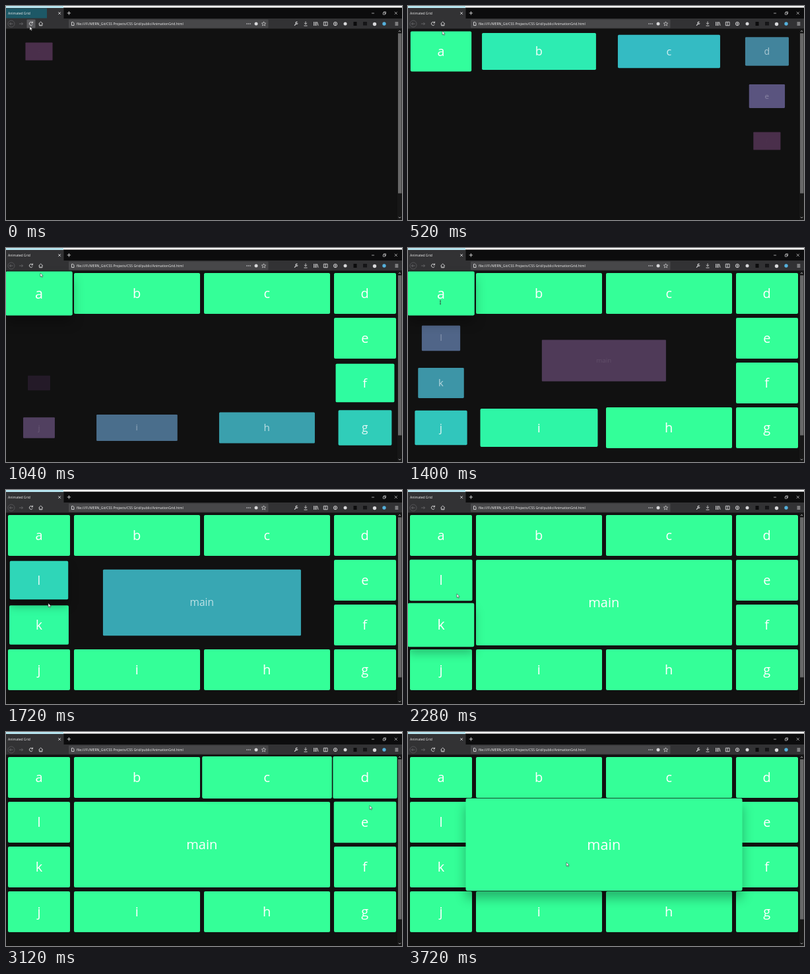
Recreate the animation shown at these times as an HTML page. Size 600 px wide and 325 px high, loop 3.76 s.

```html
<!DOCTYPE html>
<html lang="en">
<head>
<meta charset="utf-8">
<title>Animated Grid</title>
<style>
  html, body { margin: 0; width: 100%; height: 100%; overflow: hidden; background: #111; }
  #stage { position: relative; width: 600px; height: 325px; overflow: hidden; background: #111; }
  svg { position: absolute; left: 0; top: 0; }
  svg text { font-family: "Open Sans", "Noto Sans", sans-serif; }
  .icon { fill: none; stroke: #d8d8da; stroke-width: .9; }
  .dim { stroke: #69696c; }
  .cell {
    position: absolute; border-radius: 2px; text-align: center; visibility: hidden;
    font-family: "Open Sans", "Noto Sans", sans-serif; font-size: 20px;
  }
  #burst { animation: burst 3760ms linear infinite; }
  @keyframes burst { 0% { opacity: 1; } 9%, 100% { opacity: 0; } }
</style>
</head>
<body>
<div id="stage">
  <svg width="600" height="325">
    <rect width="600" height="35" fill="#0c0c0d"/>
    <rect width="600" height="2.5" fill="#fff"/>
    <rect width="87" height="3" fill="#b9e6f1"/>
    <rect y="3" width="87.5" height="16" fill="#323234"/>
    <rect y="19" width="600" height="15.5" fill="#323234"/>
    <rect id="burst" y="3.5" width="62" height="15" fill="#1d5967"/>
    <text x="3" y="12.8" font-size="5" fill="#eee">Animated Grid</text>
    <g class="icon">
      <path d="M79.3 9.2l3.6 3.6m0-3.6l-3.6 3.6M92.7 10.8h5.4m-2.7-2.7v5.4"/>
      <path d="M554 11h4M571.3 10h3v3h-3zM572.5 10v-1.2h3v3h-1.2M588.8 8.8l4 4m0-4l-4 4" stroke-width=".7"/>
      <g class="dim">
        <circle cx="8" cy="27" r="5" stroke-width=".6"/>
        <path d="M10.5 27h-5m2-2l-2 2 2 2M20 27h5.500m-2-2l2 2-2 2"/>
      </g>
      <rect id="hover" x="31.500" y="20.500" width="13" height="13" rx="1" fill="#5a5a5d" stroke="none"/>
      <path d="M40 25.200A2.600 2.600 0 1 0 40.300 28M40.500 23.500v2.300h-2.300"/>
      <path d="M49.500 27l3.200-3 3.200 3M50.500 26.500v3.300h4.400v-3.300M52.700 28v1.800"/>
    </g>
    <rect x="95" y="20.500" width="302.500" height="13" rx="1" fill="#474749"/>
    <path class="icon" d="M99.500 24.500h2.200l1.300 1.300v3.700h-3.500z" stroke-width=".6"/>
    <text x="107" y="28.900" font-size="5.100" fill="#f2f2f2">file:///F:/MERN_Git/CSS Projects/CSS Grid/public/AnimationGrid.html</text>
    <g fill="#d8d8da">
      <circle cx="365" cy="27" r=".8"/><circle cx="367.500" cy="27" r=".8"/><circle cx="370" cy="27" r=".8"/>
      <circle cx="379" cy="27" r="2.500"/>
      <circle cx="514" cy="27" r="2.500"/>
      <circle cx="558.500" cy="27.500" r="2.700"/>
      <rect x="526.500" y="24" width="5" height="6" fill="#0b0b0c"/>
      <rect x="541" y="24" width="6" height="5.500" fill="#151517"/>
      <circle cx="573" cy="27" r="2.700" fill="#55b1dc"/>
    </g>
    <g class="icon">
      <path d="M390.500 23.800l.9 2.100 2.300.2-1.700 1.500.5 2.300-2-1.200-2 1.200.5-2.300-1.700-1.500 2.300-.2z" stroke-width=".7"/>
      <path d="M437 29.700l3-3m1.500-2.200a1.500 1.500 0 1 0 .5 1.700" stroke-width="1.200"/>
      <path d="M454 23.500v4m-2-1.700l2 2 2-2M451.500 30h5"/>
      <path d="M466.500 24v6M468.500 24v6M470.300 24v6M471.500 24.300l1.600 5.500"/>
      <path d="M481.300 24.300h5.800v5.400h-5.800zM484 24.300v5.400"/>
      <circle cx="499" cy="27" r="2.700"/><circle cx="499" cy="26.500" r=".7"/><path d="M499 27v2.500"/>
      <path d="M589.500 25h4.800m-4.800 2h4.800m-4.800 2h4.800"/>
    </g>
    <rect x="593" y="34.500" width="7" height="290.500" fill="#171717"/>
    <rect x="594" y="41.500" width="5.500" height="243" fill="#686868"/>
    <path d="M595 39l1.500-1.500 1.500 1.500M595 320.500l1.500 1.500 1.500-1.500" class="icon" stroke-width=".7"/>
  </svg>
  <svg id="pointer" width="600" height="325" style="z-index:20">
    <path id="arrow" d="M0 0v5.800l1.400-1.200.9 2 1-.4-.9-2h1.800z" fill="#fff" stroke="#222" stroke-width=".5"/>
    <path id="beam" d="M-1 0h2M0 0v5M-1 5h2" fill="none" stroke="#333" stroke-width=".8"/>
  </svg>
</div>
<script>
const LOOP = 3760, FADE = 160;
const $ = id => document.getElementById(id);
const clamp = v => Math.max(0, Math.min(1, v));

// Columns and rows: start and size
const cols = [[3, 94], [103, 190.5], [300, 190.5], [497, 93.5]];
const rows = [38, 106, 174, 242];
const ring = [[0, 0], [1, 0], [2, 0], [3, 0], [3, 1], [3, 2], [3, 3], [2, 3], [1, 3], [0, 3], [0, 2], [0, 1]];

function addCell(label, x, y, w, h) {
  const el = document.createElement("div");
  el.className = "cell";
  el.textContent = label;
  el.style.cssText = `left:${x}px;top:${y}px;width:${w}px;height:${h}px;line-height:${h}px`;
  $("stage").append(el);
  return el;
}
const cells = ring.map(([c, r], i) => addCell("abcdefghijkl"[i], cols[c][0], rows[r], cols[c][1], 62));
cells.push(addCell("main", 103, 106, 387.5, 130));

// Fill colour along the entrance: [progress, colour]
const tints = [
  [-.4, "111111"], [0, "231927"], [.5, "4a2f4b"], [1, "51405f"], [1.55, "5b5681"],
  [2, "4a6d8c"], [2.6, "41889f"], [3, "3a9fac"], [3.5, "34bbc3"], [4, "30ccb9"],
  [4.4, "2ce8b6"], [5, "2ffca0"], [6, "34ff98"]
].map(([q, hex]) => [q, ...hex.match(/../g).map(h => parseInt(h, 16))]);

// Hovered cells in order: [cell, enter, leave]
const hovers = [
  [0, 620, 1560], [11, 1560, 1720], [10, 1720, 2260], [11, 2260, 2480], [0, 2480, 2740],
  [1, 2740, 2880], [2, 2880, 3030], [3, 3030, 3110], [4, 3110, 3200], [5, 3200, 3380], [12, 3380, LOOP]
];

// Pointer path: [time, x, y]
const path = [
  [0, 36, 31], [80, 36, 31], [280, 52, 38], [1180, 52, 38], [1400, 49, 80], [1560, 54, 104],
  [1720, 64, 172], [1980, 72, 200], [2260, 74, 166], [2280, 74, 158], [2480, 66, 102],
  [2620, 62, 72], [2740, 98, 62], [2880, 296, 58], [3030, 492, 66], [3120, 551, 111],
  [3200, 550, 172], [3300, 538, 208], [3380, 492, 208], [3560, 330, 204], [3720, 240, 198], [LOOP, 240, 198]
];

// Linear lookup in a list keyed by its first value
function sample(list, k) {
  let i = 1;
  while (i < list.length - 1 && list[i][0] < k) i++;
  const a = list[i - 1], b = list[i];
  const f = clamp((k - a[0]) / (b[0] - a[0]));
  return a.slice(1).map((v, n) => v + (b[n + 1] - v) * f);
}

function hoverAmount(cell, t) {
  let sum = 0;
  for (const [c, enter, leave] of hovers) {
    if (c !== cell || t < enter) continue;
    const peak = clamp((Math.min(t, leave) - enter) / FADE);
    sum += Math.max(0, peak - Math.max(0, t - leave) / FADE);
  }
  return clamp(sum);
}

function draw(t) {
  const s = t / 1000;
  const wave = .5 + 10.1 * s - .925 * s * s;
  cells.forEach((el, i) => {
    const q = wave - i, st = el.style;
    st.visibility = q > -.4 ? "visible" : "hidden";
    if (q <= -.4) return;
    const grow = q >= 5.85 ? 1 : Math.min(1, .36 + .156 * q - .0078 * q * q);
    const h = hoverAmount(i, t);
    st.transform = `scale(${grow * (1 + .08 * h)})`;
    st.backgroundColor = `rgb(${sample(tints, q).map(Math.round)})`;
    st.color = `rgba(255,255,255,${clamp((grow - .43) / .5)})`;
    st.boxShadow = h ? `0 ${10 * h}px ${16 * h}px rgba(0,0,0,${.3 * h})` : "none";
    st.zIndex = h ? 2 : 1;
  });
  const [x, y] = sample(path, t);
  const overText = t > 1320 && t < 1480;
  $("arrow").style.display = overText ? "none" : "";
  $("beam").style.display = overText ? "" : "none";
  for (const id of ["arrow", "beam"]) $(id).setAttribute("transform", `translate(${x} ${y})`);
  $("hover").style.display = t < 160 ? "" : "none";
}

const start = performance.now();
function tick() {
  draw((performance.now() - start) % LOOP);
  requestAnimationFrame(tick);
}
tick();
</script>
</body>
</html>
```
